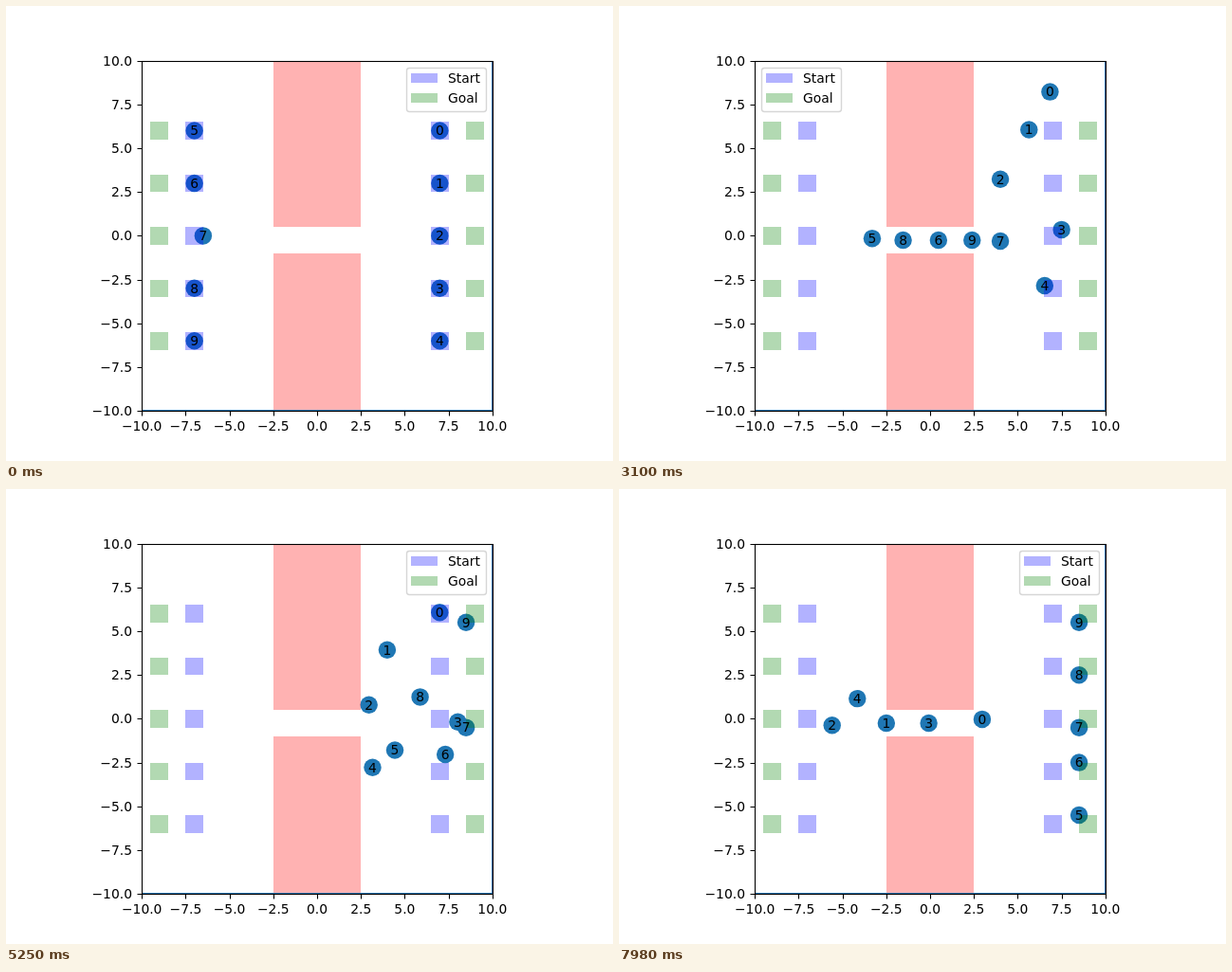
An HTML page that plays this animation: 640x480 px, repeating every 8000 ms.

```html
<!DOCTYPE html>
<html lang="en">
<head>
<meta charset="utf-8">
<title>Agents swapping sides through a gap</title>
<style>
  html, body { margin: 0; width: 100%; height: 100%; overflow: hidden; background: #fff; }
  svg { display: block; width: 640px; height: 480px; }
  text { font: 13.89px "DejaVu Sans", sans-serif; fill: #000; }
  .mid { text-anchor: middle; }
  .end { text-anchor: end; }
  .agent { fill: #1f77b4; }
  .wall { fill: rgba(255, 0, 0, .3); }
  .start { fill: rgba(0, 0, 255, .3); }
  .goal { fill: rgba(0, 128, 0, .3); }
  .axis { fill: none; stroke: #000; stroke-width: 1.1; }
  .border { fill: none; stroke: #1f77b4; stroke-width: 2; }
  .box { fill: #fff; stroke: #d6d6d6; stroke-width: 1.39; }
</style>
</head>
<body>
<svg id="stage" viewBox="0 0 640 480"></svg>
<script>
const LOOP = 8000, STEP = 25;
const UNIT = 18.48;
const GATE_X = 2.75, GATE_Y = -0.25, GATE_STEPS = 54.5, EXIT_STEPS = 80;
const px = x => 328 + UNIT * x;
const py = y => 242.4 - UNIT * y;

// path: [step, x, y] up to the gap; enter: step of entering it; goal: final y
const agents = [
  { path: [[0, 7, 6], [140, 6.82, 8.5], [212, 7, 6], [265, 7, 4]], enter: 322, goal: 2.5 },
  { path: [[0, 7, 3], [138, 5.49, 6.4], [161, 4.67, 6.18], [209, 4, 4], [250, 4, 1.05]], enter: 267, goal: -2.5 },
  { path: [[0, 7, 0], [138, 3.67, 3.59], [161, 3, 3.06], [207, 3, 1]], enter: 225, goal: -0.5 },
  { path: [[0, 7, -3], [138, 7.56, .73], [163, 8, .57], [210, 8.03, -.18], [218.5, 8, -.42], [250, 5.74, -.48]], enter: 291, goal: -5.5 },
  { path: [[0, 7, -6], [161, 6.4, -1.91], [207, 3.2, -3]], enter: 245, goal: 5.5 },
  { path: [[0, -7, 6], [49, -8.53, 3.75], [86, -5.93, 1.12], [99, -5.03, .17]], enter: 132, goal: -5.5 },
  { path: [[0, -7, 3], [42, -6.2, .45]], enter: 92, goal: -2.5 },
  { path: [[0, -6.5, 0]], enter: 52, goal: -0.5 },
  { path: [[0, -7, -3], [31, -8.3, -2.35], [86, -4.6, -.55]], enter: 112, goal: 2.5 },
  { path: [[0, -7, -6]], enter: 73, goal: 5.5 }
];

const stage = document.getElementById('stage');
function add(tag, attrs, parent = stage, content = '') {
  const node = document.createElementNS('http://www.w3.org/2000/svg', tag);
  for (const name in attrs) node.setAttribute(name, attrs[name]);
  node.textContent = content;
  return parent.appendChild(node);
}

// Rectangle in plot units, snapped to whole pixels.
function area(cls, x0, y0, x1, y1) {
  const left = Math.round(px(x0)), top = Math.round(py(y1));
  add('rect', {
    class: cls, x: left, y: top,
    width: Math.round(px(x1)) - left, height: Math.round(py(y0)) - top
  });
}

for (const agent of agents) {
  const side = Math.sign(agent.path[0][1]);
  const leave = agent.enter + GATE_STEPS;
  agent.path.push(
    [agent.enter, side * GATE_X, GATE_Y],
    [leave, -side * GATE_X, GATE_Y],
    [leave + EXIT_STEPS, -side * 8.5, agent.goal]
  );
  agent.disc = add('circle', { class: 'agent', r: UNIT / 2 });
}

area('wall', -2.5, .5, 2.5, 10);
area('wall', -2.5, -10, 2.5, -1);
for (const side of [-1, 1]) {
  for (let y = -6; y <= 6; y += 3) {
    area('start', side * 7 - .5, y - .5, side * 7 + .5, y + .5);
    area('goal', side * 9 - .5, y - .5, side * 9 + .5, y + .5);
  }
}

add('path', { class: 'border', d: 'M513 58V427H143' });
add('rect', { class: 'axis', x: 143.5, y: 58.5, width: 370, height: 369 });
for (let v = -10; v <= 10; v += 2.5) {
  const label = v.toFixed(1).replace('-', '\u2212');
  const x = Math.round(px(v)) + .5, y = Math.round(py(v)) + .5;
  add('path', { class: 'axis', d: `M${x} 428v4.5M143 ${y}h-4.5` });
  add('text', { class: 'mid', x: px(v), y: 448 }, stage, label);
  add('text', { class: 'end', x: 133, y: Math.round(py(v) + 5) }, stage, label);
}

for (const [i, agent] of agents.entries()) {
  agent.label = add('text', { class: 'mid' }, stage, i);
}

const legend = add('g', {});
add('rect', { class: 'box', x: 422.5, y: 65.5, width: 84, height: 46, rx: 2.8 }, legend);
['Start', 'Goal'].forEach((name, i) => {
  const top = 71 + 21 * i;
  add('rect', { class: name.toLowerCase(), x: 427, y: top, width: 28, height: 10 }, legend);
  add('text', { x: 466, y: top + 10 }, legend, name);
});

function locate(path, step) {
  const next = path.findIndex(point => point[0] > step);
  if (next < 0) return path[path.length - 1].slice(1);
  const [t0, x0, y0] = path[next - 1], [t1, x1, y1] = path[next];
  const k = (step - t0) / (t1 - t0);
  return [x0 + (x1 - x0) * k, y0 + (y1 - y0) * k];
}

function draw(time) {
  const step = Math.floor((time % LOOP) / STEP);
  agents.forEach((agent, i) => {
    const [x, y] = locate(agent.path, step);
    agent.disc.setAttribute('cx', px(x));
    agent.disc.setAttribute('cy', py(y));
    agent.label.setAttribute('x', px(x));
    agent.label.setAttribute('y', Math.round(py(y) + 4.8));
    // The legend gives way while agent 0 is up in its corner.
    if (i === 0) legend.setAttribute('transform', `translate(${y > 6.6 ? -272 : 0} 0)`);
  });
}

const begin = performance.now();
function tick() {
  draw(performance.now() - begin);
  requestAnimationFrame(tick);
}
tick();
</script>
</body>
</html>
```
